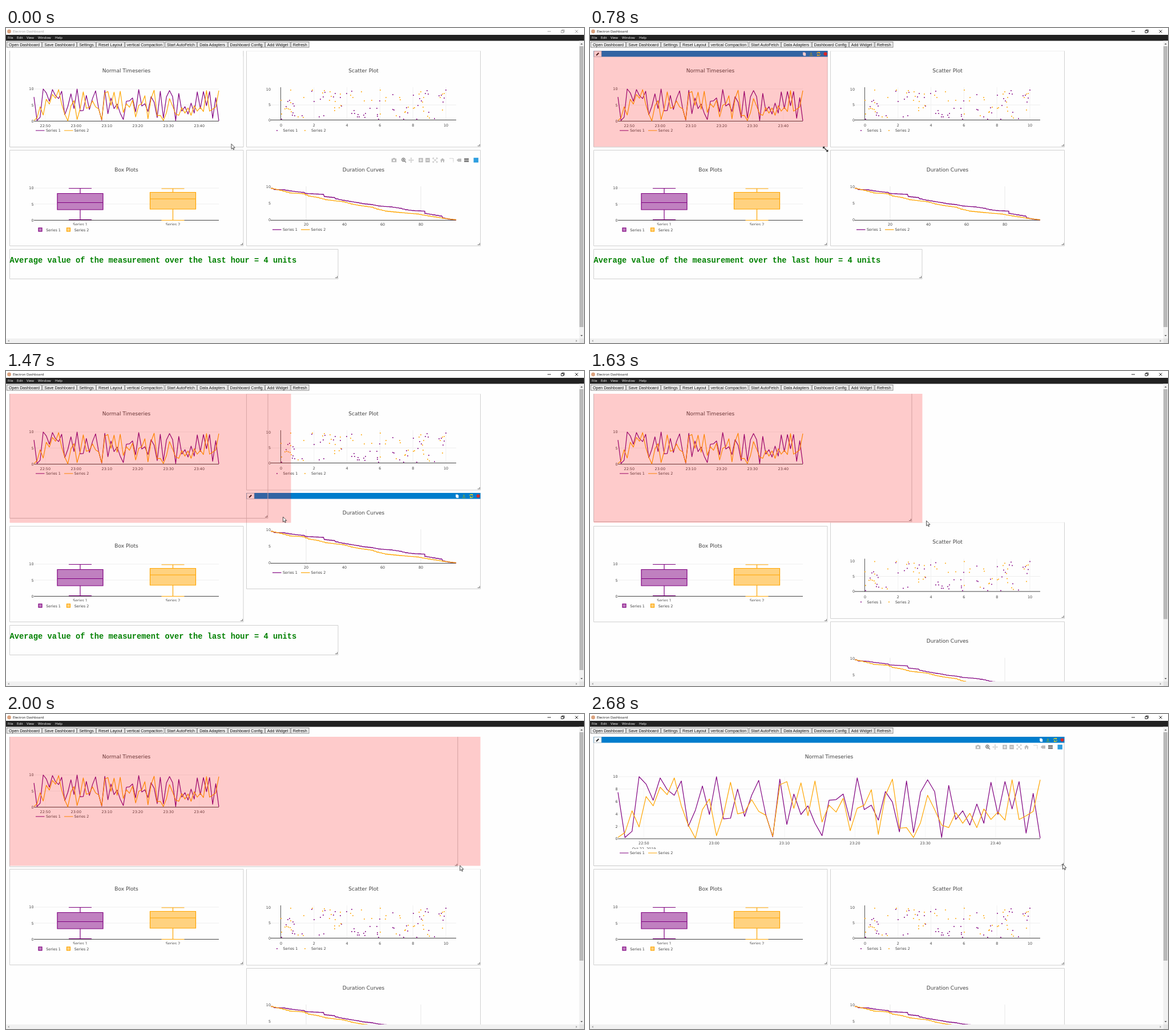
Recreate the animation shown at these times as an HTML page. Size 1013x553 px, loop 2730 ms.

```html
<!DOCTYPE html>
<html lang="en">
<head>
<meta charset="utf-8">
<title>Electron Dashboard</title>
<style>
html, body { margin: 0; width: 100%; height: 100%; overflow: hidden; background: #fefefe; }
svg { display: block; width: 1013px; height: 553px; }
text { white-space: pre; }
.ui { font-family: "Open Sans", "Noto Sans", sans-serif; }
.btn { font: 7.1px "Liberation Sans", Arial, sans-serif; fill: #111; }
.plot { font-family: "DejaVu Sans", Verdana, sans-serif; fill: #444; }
.avg { font: bold 13.74px "Liberation Mono", "Courier New", monospace; fill: #008000; }
</style>
</head>
<body>
<svg id="stage" viewBox="0 0 1013 553" xmlns="http://www.w3.org/2000/svg"></svg>
<script>
const PURPLE = '#800080', ORANGE = '#ffa500', TICK = 52.5, TICKS = 52, LOOP = 2730;

const s1 = [7.5, .2, 1.2, 10, 8.8, 6.2, 9.8, 7.9, 7, 9.3, 2, 4.6, 8.5, 3.9, 10, 3.2, 3.3, 8, 3.6, 7, 9.4,
  3.9, .3, 9.6, 2.3, 7.2, 3.9, 5.3, 2.5, .5, 6.2, 6.3, 7.2, 2.9, 9.8, 4.7, 5.4, 3, 7.6, 5.9, 1.1,
  9.3, 1, 7.5, 9.5, 7.6, .2, 8.6, 3.1, 4.5, 2.2, 5.6, 2.5, 9.1, 3.9, 9.2, 4.8, 9.2, .9, 7.3, .1];
const s2 = [.2, 1, 4.5, 1.9, 6.8, 5.3, 8.3, 7.1, 9.8, 5.3, 2.2, .1, 4.7, 6.4, .5, 3.9, 9.1, 4, 4.3, 6.3, 4.4,
  3.8, .4, 8.7, 9.2, 4.9, 9, 3.7, 9.3, 2.7, 5.4, 4.3, 6.5, 1.3, 4.9, 5.4, 7.9, .7, 7, 9.6, 1.7,
  1.8, .2, 2.6, 7, 4.7, 2.2, 1.8, 4.2, 2.5, 4.1, 1.8, 4.8, 3.1, 4.3, 3, 9.5, 3.1, 3.7, 4.4, 9.5];

const dots1 = [483,160, 491,138, 497,127, 503,133, 505,137, 494,129, 502,153, 503,149, 506,154, 519,154,
  536,111, 540,129, 551,125, 556,121, 559,113, 549,156, 557,154, 574,121, 577,115, 586,122, 588,137,
  597,115, 606,111, 606,150, 610,145, 611,150, 616,156, 617,152, 619,156, 627,153, 629,157, 630,150,
  638,141, 651,152, 651,155, 650,141, 655,128, 653,160, 678,117, 678,143, 680,144, 690,156, 697,160,
  702,140, 704,149, 714,118, 720,160, 725,124, 722,136, 728,128, 735,115, 738,110, 740,116, 741,148,
  751,159, 759,119, 763,118, 768,123, 766,130, 771,109];
const dots2 = [499,109, 482,127, 483,151, 489,142, 492,141, 495,142, 499,131, 498,143, 500,147, 512,156,
  521,157, 522,122, 537,109, 555,114, 558,110, 568,112, 570,120, 567,127, 577,129, 576,140, 576,145,
  586,116, 587,136, 584,140, 604,118, 623,112, 628,128, 608,122, 656,109, 666,122, 665,128, 641,127,
  690,122, 684,154, 656,151, 691,126, 699,148, 700,147, 705,139, 714,141, 716,140, 727,112, 724,116,
  730,130, 732,122, 731,139, 732,146, 739,155, 742,158, 761,122, 765,116, 765,144, 768,115];

const curve1 = [464,281.5, 470,283.5, 485,284, 497,286, 518,288.5, 525,290.5, 554,292, 558,296, 572,297.5,
  578,300, 590,302.5, 602,304.5, 615,306.5, 625,308.5, 640,310, 653,312.5, 673,314, 690,316.5, 700,319,
  712,320.5, 734,321.5, 734,325.5, 748,328, 760,330, 766,333.5, 775,335.5, 789,337];
const curve2 = [464,281.5, 480,285, 497,289.5, 520,291, 530,295, 545,297.5, 560,301.5, 590,305, 605,309,
  618,311.5, 640,314.5, 650,318, 665,321.5, 690,324, 720,326.5, 740,330, 750,331.5, 765,334, 789,337];

// drawing helpers
const text = (x, y, s, size, anchor = 'start', more = '') =>
  `<text x="${x}" y="${y}" font-size="${size}" text-anchor="${anchor}" ${more}>${s}</text>`;
const rect = (x, y, w, h, fill, more = '') =>
  `<rect x="${x}" y="${y}" width="${w}" height="${h}" fill="${fill}" ${more}/>`;
const path = (d, stroke, w = 1, more = '') =>
  `<path d="${d}" fill="none" stroke="${stroke}" stroke-width="${w}" ${more}/>`;
const group = (id, body, more = '') => `<g id="${id}" ${more}>${body}</g>`;
const title = (x, y, s) => text(x, y, s, 9.05, 'middle');
const label = (x, y, s, anchor = 'middle', more = '') => text(x, y, s, 6.4, anchor, more);
const hline = (x1, x2, y, c) => path(`M${x1} ${y}H${x2}`, c);
const vline = (x, y1, y2, c) => path(`M${x} ${y1}V${y2}`, c);
const yLabels = (x, y0, y10, step) => {
  let out = '';
  for (let v = 0; v <= 10; v += step) out += label(x, y0 + (y10 - y0) * v / 10 + 2.3, v, 'end');
  return out;
};
const frameD = (l, t, r, b) => `M${l - .5} ${t}V${b - .5}H${r - .5}V${t}`;
const gripD = (r, b) => `M${r - 2} ${b - 5.5}V${b - 2.5}H${r - 5.5}`;
const frame = (l, t, r, b, top) =>
  path(frameD(l, t, r, b) + (top ? 'z' : ''), '#d0d0d0') + path(gripD(r, b), '#777', 1.1);
const lineLegend = (x, y) => path(`M${x} ${y}h15.5`, PURPLE, 1.2) + label(x + 18, y + 2.3, 'Series 1', 'start') +
  path(`M${x + 50} ${y}h15.5`, ORANGE, 1.2) + label(x + 67.5, y + 2.3, 'Series 2', 'start');

function timeseries(right, y0, y10, step, tick, legendY) {
  const dx = (right - 49) / 60, k = (y0 - y10) / 10;
  const trace = (s, c) => path('M' + s.map((v, i) => `${(49 + i * dx).toFixed(1)} ${(y0 - v * k).toFixed(1)}`).join('L'),
    c, 1.2, 'stroke-linejoin="round"');
  let out = title((right + 49) / 2, 77.5, 'Normal Timeseries');
  for (let v = step; v <= 10; v += step) out += hline(49, right, y0 - v * k, '#efefef');
  for (let i = 0; i < 6; i++) {
    const x = tick + i * dx * 10;
    out += vline(x, y10, y0, '#f5f5f5') +
      label(x, y0 + 10, i ? `23:${i - 1}0` : '22:50');
  }
  return out + hline(49, right, y0, '#444') + yLabels(48.5, y0, y10, step) +
    trace(s1, PURPLE) + trace(s2, ORANGE) + lineLegend(52, legendY);
}

function scatter() {
  const dots = (p, c) => {
    let d = '';
    for (let i = 0; i < p.length; i += 2) d += `M${p[i]} ${p[i + 1]}h0`;
    return path(d, c, 1.9, 'stroke-linecap="round"');
  };
  let out = title(626.5, 77.5, 'Scatter Plot') + hline(464, 789, 135, '#eee');
  for (let i = 0; i < 6; i++) {
    const x = 482 + i * 57.8;
    out += (i ? vline(x, 104, 161, '#f1f1f1') : '') + label(x, 173, i * 2);
  }
  return out + vline(481.5, 104, 162, '#555') + hline(464, 789, 161.5, '#444') + yLabels(464, 161.5, 108, 5) +
    dots(dots1, PURPLE) + dots(dots2, ORANGE) +
    dots([475, 180], PURPLE) + label(485.5, 182.3, 'Series 1', 'start') +
    dots([524, 180], ORANGE) + label(535, 182.3, 'Series 2', 'start');
}

function boxes() {
  const box = (x, hi, q3, med, q1, lo, c, fill) => rect(x - 40, q3, 80, q1 - q3, fill) +
    path(`M${x - 40} ${q3}h80V${q1}h-80zM${x - 40} ${med}h80M${x} ${q3}V${hi}M${x} ${q1}V${lo}M${x - 20} ${hi}h40M${x - 20} ${lo}h40`, c, 1.2);
  const key = (x, c, fill, s) => rect(x, 351, 6, 6, fill, `stroke="${c}" stroke-width="1.2"`) + label(x + 13.2, 356.5, s, 'start');
  return title(211, 251.5, 'Box Plots') + hline(49, 373, 281, '#efefef') + hline(49, 373, 309, '#efefef') +
    hline(49, 373, 337.5, '#444') + yLabels(48.5, 337.5, 281, 5) +
    box(130, 281.5, 290.5, 306.5, 319, 336.5, PURPLE, '#c080c0') +
    box(292.5, 282, 288.5, 300, 318, 337.5, ORANGE, '#ffd280') +
    `<g clip-path="url(#boxCut)">${label(130, 347.3, 'Series 1')}${label(292.5, 347.3, 'Series 2')}</g>` +
    key(57, PURPLE, '#c080c0', 'Series 1') + key(106.5, ORANGE, '#ffd280', 'Series 2');
}

function duration() {
  const stairs = (p, c) => {
    let d = `M${p[0]} ${p[1]}`;
    for (let i = 2; i < p.length; i += 2) {
      const [x, y, u, v] = p.slice(i - 2, i + 2), n = Math.max(1, Math.round((u - x) / 5));
      for (let j = 1; j <= n; j++) {
        const e = x + (u - x) * j / n;
        d += `H${(e - (u - x) / n * .4).toFixed(1)}L${e.toFixed(1)} ${(y + (v - y) * j / n).toFixed(1)}`;
      }
    }
    return path(d, c, 1.3);
  };
  return title(626.5, 251.5, 'Duration Curves') + vline(526, 278, 337, '#e8e8e8') + vline(727, 278, 337, '#e8e8e8') +
    hline(464, 789, 337.5, '#444') + yLabels(464, 337, 279, 5) +
    [20, 40, 60, 80].map(v => label(459 + v * 3.35, 347, v)).join('') +
    stairs(curve1, PURPLE) + stairs(curve2, ORANGE) + lineLegend(467, 354);
}

function modebar(id, y) {
  const g = '#bbb', at = (x, body) => `<g transform="translate(${x} ${y})">${body}</g>`;
  const box = mark => rect(-3.8, -3.8, 7.6, 7.6, g) + path(mark, '#fff', 1.1);
  return group(id,
    at(680, rect(-4.3, -2.7, 8.6, 6.2, g) + rect(-2, -3.8, 4, 2, g) + '<circle r="1.6" cy=".4" fill="#fff"/>') +
    at(697, path('M2.4 -.8A2.9 2.9 0 1 1 -3.4 -.8A2.9 2.9 0 1 1 2.4 -.8M1.4 1.4L4 4M-2 -.8h3M-.5 -2.3v3', '#777', 1.2)) +
    at(710, path('M-4 0H4M0 -4V4M-3 -1.2L-4.2 0L-3 1.2M3 -1.2L4.2 0L3 1.2M-1.2 -3L0 -4.2L1.2 -3M-1.2 3L0 4.2L1.2 3', g, .9)) +
    at(727, box('M-2.4 0h4.8M0 -2.4v4.8')) + at(739, box('M-2.4 0h4.8')) +
    at(752, path('M-3.5 -3.5L3.5 3.5M3.5 -3.5L-3.5 3.5M-4 -1.8V-4H-1.8M1.8 -4H4V-1.8M4 1.8V4H1.8M-1.8 4H-4V1.8', g, .9)) +
    at(765, `<path d="M-4.3 .3L0 -3.8L4.3 .3H3V3.7H1V1H-1V3.7H-3V.3z" fill="${g}"/>`) +
    at(781, path('M-3.5 -3H3V3.5', g, 1, 'stroke-dasharray="2 1"')) +
    at(794, `<path d="M-4.2 0L-1.5 -2.7H4V2.7H-1.5z" fill="${g}"/>`) +
    at(807, rect(-4, -3.2, 8, 2.8, '#777') + rect(-4, .5, 8, 2.8, '#777')) +
    at(823.5, rect(-4, -4.2, 8.4, 8.4, '#2f9fe0')));
}

// widget header; the icons hang on the right edge
const header = (id, l, t) => group(id,
  `<rect class="bar" x="${l}" y="${t}" height="10.5" fill="#007dcc"/>` +
  rect(l + .5, t + .5, 13, 10, '#fafafa', 'stroke="#bbb" stroke-width=".6"') +
  path(`M${l + 4.6} ${t + 8}l4.2 -4.2`, '#222', 2) +
  `<g class="icons">` +
  rect(-43.5, t + 2.6, 4, 5, '#cfe6f5') + rect(-42.3, t + 3.8, 4, 5, '#fff') +
  path(`M-29 ${t + 2.5}v4M-31 ${t + 4.8}l2 2l2 -2M-32 ${t + 8.4}h6`, '#7fa83a', 1) +
  path(`M-18.8 ${t + 5}a2.8 2.8 0 0 1 5 -1.4M-13 ${t + 6}a2.8 2.8 0 0 1 -5 1.4M-14 ${t + 2}v2h-2M-18 ${t + 9}v-2h2`, '#e8d020', 1.1) +
  `<circle cx="-4" cy="${t + 5.5}" r="3" fill="#d42a2a"/></g>`);

function chrome() {
  const menus = [['File', 3], ['Edit', 19], ['View', 36], ['Window', 56], ['Help', 86]];
  const buttons = [['Open Dashboard', 1, 62.5], ['Save Dashboard', 63.5, 123.5], ['Settings', 124.5, 157],
    ['Reset Layout', 158, 207.5], ['vertical Compaction', 208.5, 277], ['Start AutoFetch', 278.5, 334],
    ['Data Adapters', 335, 388], ['Dashboard Config', 389, 453], ['Add Widget', 454, 498], ['Refresh', 499, 531]];
  return rect(0, 0, 1013, 12, '#fff') + '<circle cx="5.5" cy="6" r="3.4" fill="#dba27e"/>' +
    group('bar', text(12, 8.4, 'Electron Dashboard', 5.9, 'start', 'class="ui"') +
      '<path d="M949 6H955M973 4.5h4v4h-4zM974.3 4.5V3.2h4v4h-1.3M997.5 3.5l5 5M1002.5 3.5l-5 5" fill="none" stroke="currentColor" stroke-width=".9"/>', 'fill="currentColor"') +
    rect(0, 12, 1013, 10.5, '#222') +
    menus.map(([s, x]) => text(x, 19.4, s, 6, 'start', 'class="ui" fill="#fff"')).join('') +
    buttons.map(([s, a, b]) => rect(a + .5, 24.5, b - a - .5, 9.5, '#efefef', 'stroke="#808080" stroke-width=".9"') +
      `<text class="btn" x="${(a + b) / 2 + .2}" y="31.9" text-anchor="middle">${s}</text>`).join('') +
    rect(1004.5, 22.5, 8.5, 530.5, '#f1f1f1') + rect(0, 545, 1013, 8, '#f1f1f1') + rect(1005, 545, 8, 8, '#e4e4e4') +
    '<rect id="thumb" x="1005" y="32" width="7" fill="#b9b9b9"/>' +
    '<path d="M1006.8 29l2 -2.2l2 2.2zM1006.8 539l2 2.2l2 -2.2z" fill="#555"/>' +
    '<path d="M5.5 547.2l-2.2 2l2.2 2zM998.8 547.2l2.2 2l-2.2 2z" fill="#999"/>';
}

document.getElementById('stage').innerHTML =
  `<defs><clipPath id="page"><rect x="0" y="36" width="1004.5" height="509"/></clipPath>
   <clipPath id="boxCut"><rect x="40" y="338" width="340" height="8.3"/></clipPath>
   <clipPath id="dateCut"><rect x="60" y="232" width="80" height="5"/></clipPath></defs>` +
  rect(0, 0, 1013, 553, '#fefefe') +
  group('content',
    group('scatter', frame(422, 40, 832, 209.5) + hline(421.5, 831.5, 40.5, '#f0f0f0') + scatter()) +
    group('boxes', frame(7, 214.5, 416.5, 383, true) + boxes()) +
    group('duration', frame(422, 214.5, 832, 383, true) + duration() + modebar('durBar', 232) + header('durHead', 421.5, 214)) +
    group('avg', frame(7, 388.5, 582.5, 441, true) +
      '<text class="avg" x="6.5" y="411.5">Average value of the measurement over the last hour = 4 units</text>') +
    '<path id="edge" fill="none" stroke="#c8c8c8"/><path id="grip" fill="none" stroke="#777" stroke-width="1.1"/>' +
    group('narrow', rect(7, 50, 408.5, 158, '#fefefe') + timeseries(373, 163.5, 107, 5, 68.8, 180)) +
    group('wide', timeseries(789, 219, 110, 2, 94.3, 244) +
      label(94.5, 239, 'Oct 22, 2019', 'middle', 'clip-path="url(#dateCut)"') + modebar('wideBar', 58)) +
    header('head', 6.5, 40) +
    '<rect id="ghost" x="6.5" y="40" fill="#f00" opacity=".2"/>', 'class="plot" clip-path="url(#page)"') +
  chrome() +
  '<path id="arrow" d="M0 0V9L2.1 7.1L3.5 10.2L4.9 9.6L3.5 6.6H6.3z" fill="#fff" stroke="#222" stroke-width=".8"/>' +
  '<path id="sizer" d="M-3.5 -3.5L4 4M-3.8 -.8V-3.8H-.8M4.3 1.3V4.3H1.3" fill="none" stroke="#222" stroke-width="1.1"/>';

// keys: tick, x, y
const pointer = [[0, 395, 203.5], [1, 395, 203.5], [8, 410, 207], [11, 410, 207], [15, 412.5, 212.5], [18, 410, 237],
  [21, 408.5, 253], [24, 408.5, 253], [28, 485.5, 256], [35, 728.5, 272], [39, 818, 264], [43, 818, 264],
  [45, 815, 263], [47, 815, 263], [50, 828.5, 263.5]];
const corner = [[0, 416.5, 209.5], [15, 416.5, 209.5], [18, 414, 240], [21, 411.5, 256.5], [24, 411.5, 256.5],
  [28, 459.5, 259], [35, 704.5, 273], [39, 821.5, 267], [47, 821.5, 267], [51, 831.5, 267]];

const clamp = v => Math.min(1, Math.max(0, v));
function at(keys, n) {
  const i = keys.findIndex(k => k[0] > n);
  if (i < 0) return keys[keys.length - 1].slice(1);
  const [a, b] = [keys[i - 1], keys[i]], p = (n - a[0]) / (b[0] - a[0]);
  return [1, 2].map(j => a[j] + (b[j] - a[j]) * p);
}
// the CSS "ease" curve
function ease(p) {
  p = clamp(p);
  let lo = 0, hi = 1, s = .5;
  for (let i = 0; i < 20; i++) {
    s = (lo + hi) / 2;
    .75 * s * (1 - s) + s ** 3 < p ? lo = s : hi = s;
  }
  return .3 * s * (1 - s) ** 2 + 3 * s * s * (1 - s) + s ** 3;
}
const slide = (n, start) => ease((n - start) * TICK / 200);

const $ = id => document.getElementById(id);
const set = (id, attrs) => { for (const k in attrs) $(id).setAttribute(k, attrs[k]); };
const show = (id, on) => set(id, { visibility: on ? 'visible' : 'hidden' });
const move = (id, x, y) => set(id, { transform: `translate(${x.toFixed(2)} ${y.toFixed(2)})` });
function stretch(id, left, right) {
  $(id).querySelector('.bar').setAttribute('width', right - left);
  $(id).querySelector('.icons').setAttribute('transform', `translate(${right})`);
}
stretch('durHead', 421.5, 831.5);

function draw(n) {
  const [x, y] = at(pointer, n), [r, b] = at(corner, n);
  const down = slide(n, 17.75), push = slide(n, 28);
  move('boxes', 0, 58 * down);
  move('avg', 0, 58 * down + 174 * push);
  move('scatter', 0, 232 * push);
  move('duration', 0, 232 * push);
  set('thumb', { height: 493 - 92 * push });

  set('edge', { d: frameD(7, 40, r, b) });
  set('grip', { d: gripD(r, b) });
  set('ghost', { width: Math.round((r - 2) / 83) * 83 - 5, height: Math.round((b - 35) / 58) * 58 - 5.5 });
  show('ghost', n >= 12 && n < 48);

  show('head', n >= 4 && n <= 16 || n >= 49);
  stretch('head', 6.5, r);
  show('durHead', n >= 26 && n <= 29);
  set('durBar', { opacity: 1 - ease((n - 1.5) / 5.7) });
  show('narrow', n < 50);
  show('wide', n >= 50);
  set('bar', { color: n < 12 ? '#999' : '#111' });

  const sizing = n >= 8 && n <= 16;
  show('sizer', sizing);
  show('arrow', !sizing);
  move('sizer', x, y);
  move('arrow', x, y);
}

let last = -1;
function loop(now) {
  const t = Math.floor(now % LOOP / 10) * 10;
  const n = Math.min(TICKS - 1, Math.floor((t + 9.9) / TICK));
  if (n !== last) draw(last = n);
  requestAnimationFrame(loop);
}
draw(0);
let start;
requestAnimationFrame(now => { start = now; requestAnimationFrame(function run(t) { loopAt(t - start); requestAnimationFrame(run); }); });
function loopAt(ms) {
  const t = Math.floor(ms % LOOP / 10) * 10;
  const n = Math.min(TICKS - 1, Math.floor((t + 9.9) / TICK));
  if (n !== last) draw(last = n);
}
</script>
</body>
</html>
```
